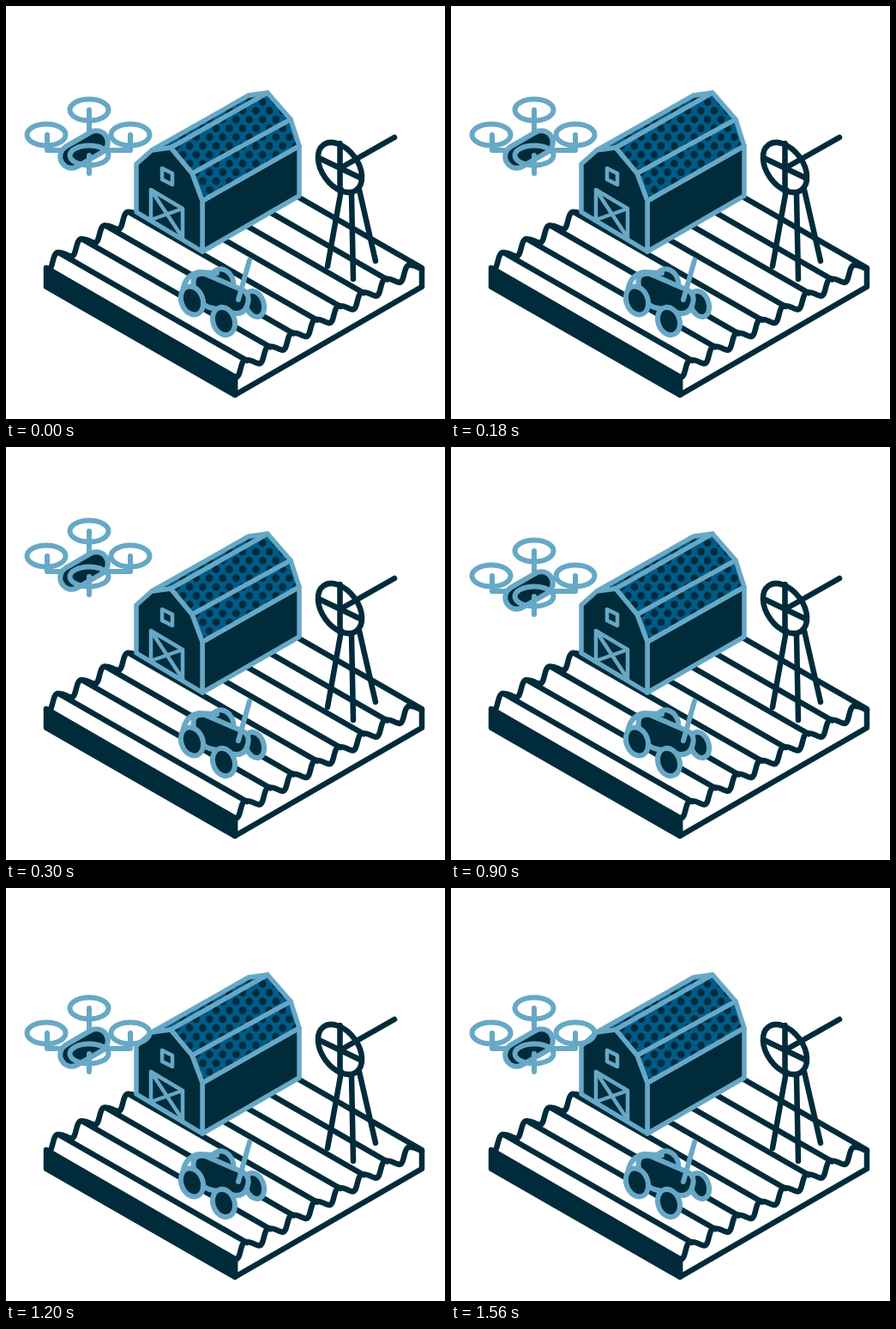
Animation of 512x481 px, one loop 1.8 s. Source, as an HTML page:

```html
<!DOCTYPE html>
<html lang="en">
<head>
<meta charset="utf-8">
<title>Smart farm</title>
<style>
  :root { --dark: #002b3b; --light: #67a8c6; --roof: #005b88; }
  html, body { margin: 0; width: 100%; height: 100%; overflow: hidden; background: #fff; }
  svg { display: block; width: 100%; height: 100%; }
  g { stroke-linecap: round; stroke-linejoin: round; }
  .land, .mill { fill: none; stroke: var(--dark); stroke-width: 6.5; }
  .barn, .rover, .drone { fill: var(--dark); stroke: var(--light); stroke-width: 6; }
  .barn { stroke-width: 5.5; }
  .land .soil { fill: var(--dark); }
  .dots { fill: var(--dark); stroke: none; }
  .open { fill: none; }
  .drone { animation: hover 1800ms step-end infinite; }
  @keyframes hover {
    0%, 50%, 100% { transform: translateY(0); }
    16.6667% { transform: translateY(-23px); }
    66.6667% { transform: translateY(19px); }
  }
</style>
</head>
<body>
<svg viewBox="0 0 512 481">
  <defs>
    <pattern id="dots" x="283.75" y="117" width="15.5" height="20.5" patternUnits="userSpaceOnUse">
      <rect width="16" height="21" fill="var(--roof)" stroke="none"/>
      <g class="dots">
        <circle cx="7.75" cy="5" r="4.4"/>
        <circle cx="0" cy="15.25" r="4.4"/>
        <circle cx="15.5" cy="15.25" r="4.4"/>
      </g>
    </pattern>
  </defs>

  <g class="land">
    <path class="soil" d="M47 305L267 432V453L47 327Z"/>
    <path id="furrows"/>
    <path d="M267 432V453L485 327V305L340 222"/>
  </g>

  <g class="barn">
    <path d="M229 227L342 163V221L229 286Z"/>
    <path fill="url(#dots)" d="M170 168L283 104L305 101L332 132L342 163L229 227L217 195L192 165Z"/>
    <path class="open" d="M192 165L305 101M217 195L332 132"/>
    <path d="M152 184L170 168L192 165L217 195L229 227V286L152 240Z"/>
    <path class="open" stroke-width="4.5" d="M169 249V214L206 236V270M169 214L206 270M206 236L169 249M182 189L194 195V208L182 202Z"/>
  </g>

  <g class="mill">
    <path d="M391 214L375 303M403 219L405 318M412 214L431 297"/>
    <ellipse cx="389.5" cy="188" rx="32.5" ry="21" transform="rotate(54 389.5 188)"/>
    <path d="M389.5 160V216M367 178L413 200M389.5 189L453 153"/>
  </g>

  <g class="rover">
    <ellipse cx="252" cy="322" rx="13" ry="16" transform="rotate(-20 252 322)"/>
    <ellipse cx="290" cy="347" rx="10.5" ry="15.5" transform="rotate(-20 290 347)"/>
    <path class="open" d="M206 332Q209 313 225 310L246 311"/>
    <path d="M219 326Q216 310 232 312L274 330Q285 334 282 346Q279 359 267 358L237 351Q222 345 219 326Z"/>
    <ellipse cx="217" cy="343" rx="12.5" ry="17" transform="rotate(-20 217 343)"/>
    <ellipse cx="254" cy="367" rx="12.5" ry="16.5" transform="rotate(-20 254 367)"/>
    <path class="open" d="M284 296L271 342"/>
  </g>

  <g class="drone">
    <path class="open" d="M97 121V150M48 150V168H68M145 150V168H118"/>
    <rect x="61" y="153.5" width="60" height="27" rx="13.5" transform="rotate(-30 91 167)"/>
    <path class="open" d="M97 174V195"/>
    <g class="open">
      <ellipse cx="97" cy="121" rx="22.5" ry="12.5"/>
      <ellipse cx="47" cy="150" rx="22.5" ry="12.5"/>
      <ellipse cx="145" cy="150" rx="22.5" ry="12.5"/>
      <ellipse cx="97" cy="174" rx="22.5" ry="11.5"/>
    </g>
  </g>
</svg>
<script>
  const STEP = [27.25, -15.75];
  const RIDGES = 8;
  const wave = (x, y, count) =>
    `M${x} ${y}` + "c8 2 5 -20 13 -20s8 3 14.25 4.25".repeat(count);

  // Ridge lines join matching crests on the far and near profiles.
  let path = wave(48, 307, 4) + wave(267, 432, RIDGES);
  for (let i = 0; i < RIDGES - 1; i++) {
    const x = 62 + i * STEP[0];
    const y = 287.5 + i * STEP[1];
    path += `M${x} ${y}l219 125.5`;
  }
  document.getElementById("furrows").setAttribute("d", path);
</script>
</body>
</html>
```
